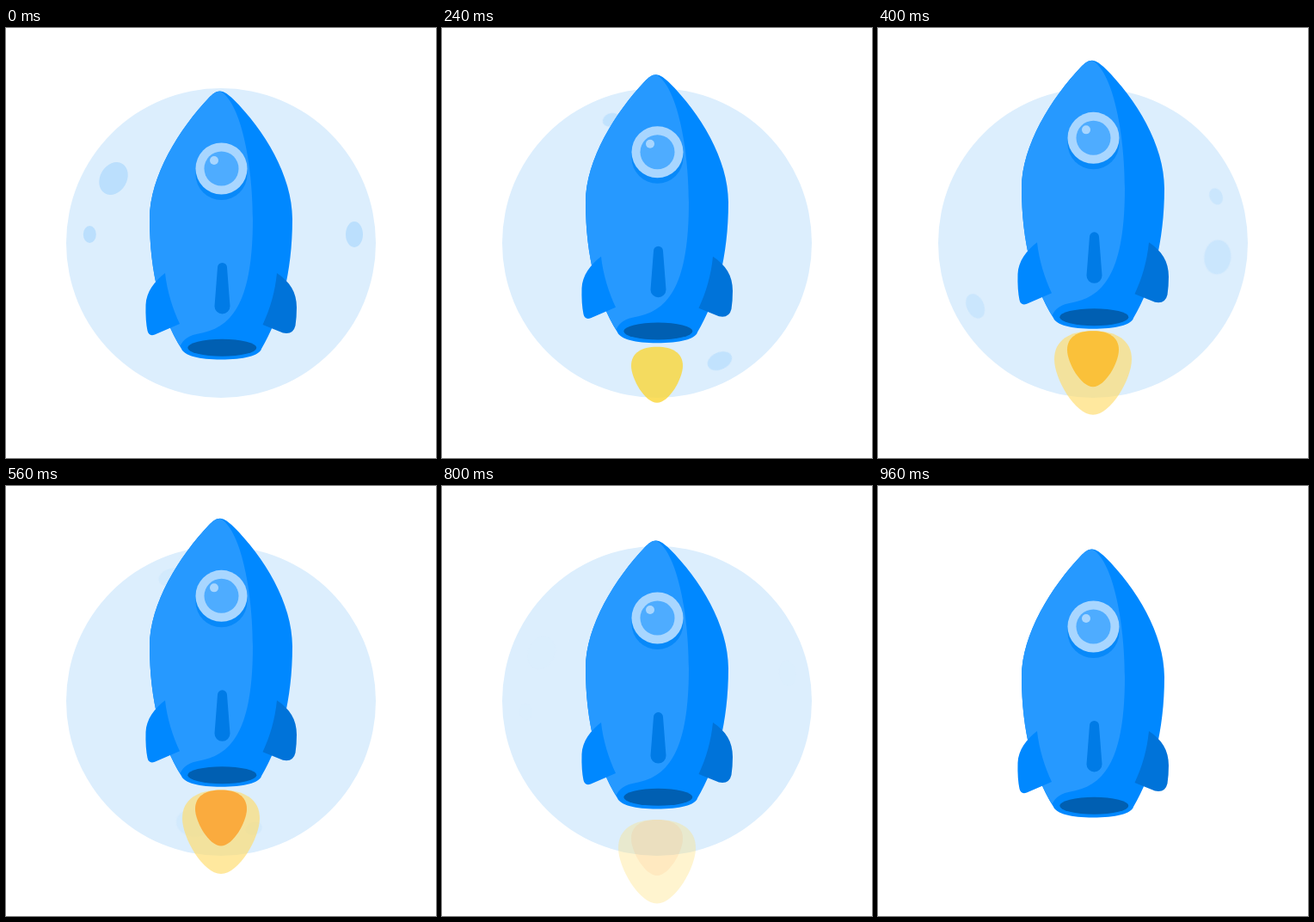
An HTML page for the animation above (1040 ms loop, 500 by 500 pixels).

```html
<!DOCTYPE html>
<html lang="en">
<head>
<meta charset="utf-8">
<title>Rocket</title>
<style>
  html, body { margin: 0; width: 100%; height: 100%; overflow: hidden; background: #fff; }
  svg { display: block; width: 100%; height: 100%; }
</style>
</head>
<body>
<svg viewBox="0 0 500 500">
  <defs>
    <path id="drop" d="M0 0C18 0 30 7 30 22C30 37 14 65 0 65C-14 65 -30 37 -30 22C-30 7 -18 0 0 0Z"/>
  </defs>

  <g id="moon">
    <circle cx="250" cy="250" r="180" fill="#dceefd"/>
    <g id="craters" fill="#bbdffd">
      <ellipse cx="125" cy="175" rx="15.5" ry="20" transform="rotate(30 125 175)"/>
      <ellipse cx="97.300" cy="240" rx="7.500" ry="10"/>
      <ellipse cx="405" cy="240" rx="10" ry="15"/>
    </g>
  </g>

  <g id="flame">
    <use id="outer" href="#drop" transform="scale(1.5)" fill="#ffdc6d"/>
    <use id="inner" href="#drop"/>
  </g>

  <g id="rocket">
    <path fill="#0088ff" d="M249 73.500C254 73.500 259 78 264 82.500C300 118 333 172 333 222C333 285 319 336 297 373C295 381 276 385.500 250 385.500C225 385.500 207 381 204 373C181 336 167 285 167 222C167 172 202 117 236 81C240 77 244 73.500 249 73.500Z"/>
    <path fill="#2699ff" d="M249 73.500C272 85 287 155 287 222C287 315 265 348 226 355C213 357 206 362 202.500 370C181 336 167 285 167 222C167 172 202 117 236 81C240 77 244 73.500 249 73.500Z"/>
    <ellipse cx="251.300" cy="371.800" rx="40" ry="10" fill="#005fb2"/>
    <path fill="#0088ff" d="M185 285C187 305 194 327 202 344L173 356.500Q166 359 164.500 352Q162 340 162.500 322C163 307 173 294 185 285Z"/>
    <path fill="#0073d9" d="M315 285C330 295 338 307 338 325Q338 336 336.500 346Q334 357 322 354.500L298.500 345C307 327 313 306 315 285Z"/>
    <path fill="#007be6" d="M246 278.500A5.500 5.500 0 0 1 257 278.500L260.500 323.500A9 9 0 0 1 242.500 323.500Z"/>
    <circle cx="250.500" cy="170" r="30" fill="#0889f9"/>
    <circle cx="250.500" cy="163.500" r="30" fill="#a8d6ff"/>
    <circle cx="250.500" cy="163.500" r="20" fill="#4eacff"/>
    <circle cx="242" cy="154" r="5" fill="#a8d6ff"/>
  </g>
</svg>
<script>
  const LOOP = 1040, STEP = 80;
  const [moon, craters, flame, outer, inner, rocket] =
    ['moon', 'craters', 'flame', 'outer', 'inner', 'rocket'].map(id => document.getElementById(id));

  const ramp = (t, a, b) => Math.min(1, Math.max(0, (t - a) / (b - a)));
  const ease = (t, a, b) => {
    const x = ramp(t, a, b);
    return x * x * (3 - 2 * x);
  };
  const mix = (a, b, k) => Math.round(a + (b - a) * k);

  function draw(t) {
    const spin = ease(t, 0, 880);
    moon.style.display = t < 960 ? '' : 'none';
    craters.setAttribute('transform', `rotate(${360 * spin} 250 250)`);
    craters.setAttribute('opacity', 1 - spin);

    const lift = 38.5 * (ease(t, 0, 480) - ease(t, 480, 960));
    rocket.setAttribute('transform', `translate(0 ${-lift})`);

    const flameY = 392.5 - 43.5 * (ease(t, 0, 480) - ease(t, 480, 880));
    flame.setAttribute('transform', `translate(250 ${flameY})`);
    outer.setAttribute('opacity', 0.66 * (ramp(t, 240, 360) - ramp(t, 720, 880)));
    inner.setAttribute('opacity', ease(t, 0, 340) - ease(t, 560, 860));

    // yellow warms to orange
    const heat = (t - 160) / 400;
    inner.setAttribute('fill', `rgb(250,${mix(225, 171, heat)},${mix(52, 62, heat)})`);
  }

  const start = performance.now();
  function tick() {
    const t = (performance.now() - start) % LOOP;
    draw(Math.floor(t / STEP) * STEP);
    requestAnimationFrame(tick);
  }
  tick();
</script>
</body>
</html>
```
